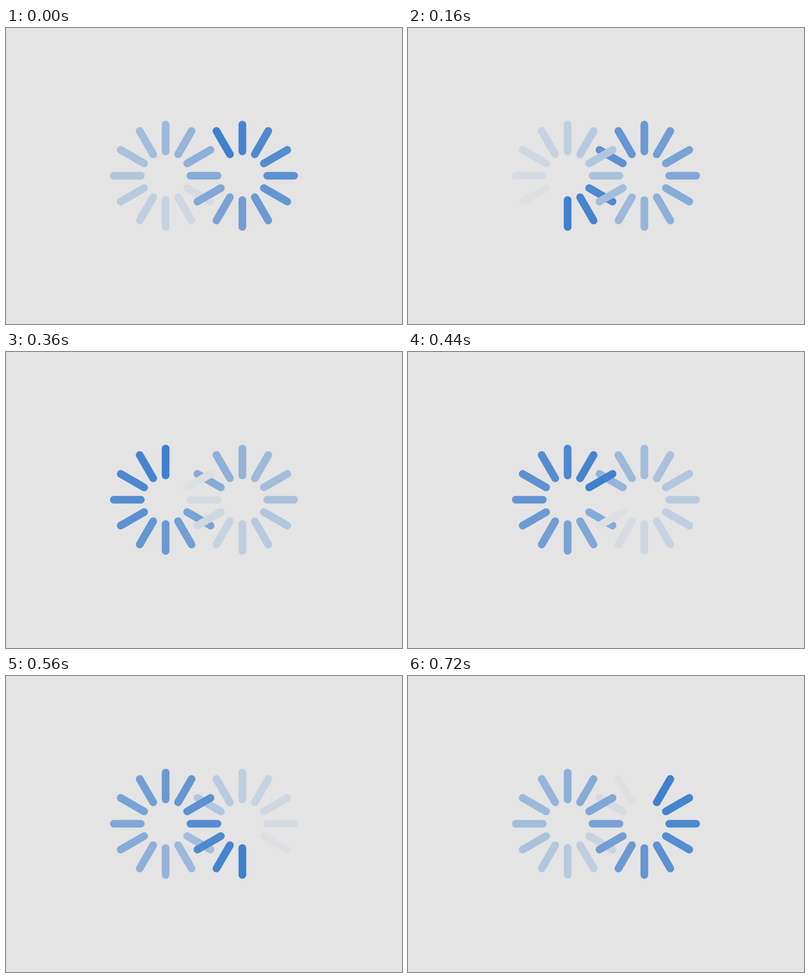
Animation of 800x600 px, one loop 760 ms. Source, as an HTML page without scripts:

```html
<!DOCTYPE html>
<html lang="en">
<head>
<meta charset="utf-8">
<title>Infinity spinner</title>
<style>
  @property --tick { syntax: "<number>"; inherits: true; initial-value: 0; }
  @property --skip { syntax: "<number>"; inherits: true; initial-value: 0; }

  html, body { margin: 0; width: 100%; height: 100%; overflow: hidden; background: #e4e4e4; }

  /* 24 places on the path in 19 ticks: every fourth tick moves two places */
  svg {
    display: block;
    width: 800px;
    height: 600px;
    animation: tick 760ms steps(19) -1ms infinite, skip 760ms step-end -1ms infinite;
  }
  @keyframes tick { from { --tick: 0; } to { --tick: 19; } }
  @keyframes skip {
    0% { --skip: 0; }
    21.0526% { --skip: 1; }
    42.1052% { --skip: 2; }
    63.1578% { --skip: 3; }
    84.2105% { --skip: 4; }
  }

  /* --p is the place on the path; age counts the steps since the head was there */
  use {
    --lead: calc(var(--tick) + var(--skip) - var(--p));
    --age: calc(var(--lead) + 24 * clamp(0, 0 - var(--lead), 1));
    stroke: rgb(
      calc(64 + 164 / 23 * var(--age)),
      calc(128 + 100 / 23 * var(--age)),
      calc(205 + 23 / 23 * var(--age)));
    stroke-width: 15.6px;
    stroke-linecap: round;
    transform: rotate(var(--angle)) translateX(var(--shift, 0px));
  }
  .left use { --angle: calc((var(--p) - 2) * 30deg); }
  .right use { --angle: calc((20 - var(--p)) * 30deg); }
  .upright { --shift: -1px; }
</style>
</head>
<body>
<svg viewBox="0 0 800 600">
  <defs><path id="bar" d="M50.2 0H104.7"/></defs>

  <g class="right" transform="translate(477.5 299.5)">
    <use href="#bar" style="--p:0"/>
    <use href="#bar" style="--p:1"/>
    <use href="#bar" style="--p:16"/>
    <use href="#bar" style="--p:17" class="upright"/>
    <use href="#bar" style="--p:18"/>
    <use href="#bar" style="--p:19"/>
    <use href="#bar" style="--p:20"/>
    <use href="#bar" style="--p:21"/>
    <use href="#bar" style="--p:22"/>
    <use href="#bar" style="--p:23" class="upright"/>
  </g>

  <!-- place 2 is the same bar as place 14, which covers it -->
  <g class="left" transform="translate(322.5 299.5)">
    <use href="#bar" style="--p:3"/>
    <use href="#bar" style="--p:4"/>
    <use href="#bar" style="--p:5" class="upright"/>
    <use href="#bar" style="--p:6"/>
    <use href="#bar" style="--p:7"/>
    <use href="#bar" style="--p:8"/>
    <use href="#bar" style="--p:9"/>
    <use href="#bar" style="--p:10"/>
    <use href="#bar" style="--p:11" class="upright"/>
    <use href="#bar" style="--p:12"/>
    <use href="#bar" style="--p:13"/>
    <use href="#bar" style="--p:14"/>
  </g>

  <g class="right" transform="translate(477.5 299.5)">
    <use href="#bar" style="--p:15"/>
  </g>
</svg>
</body>
</html>
```
